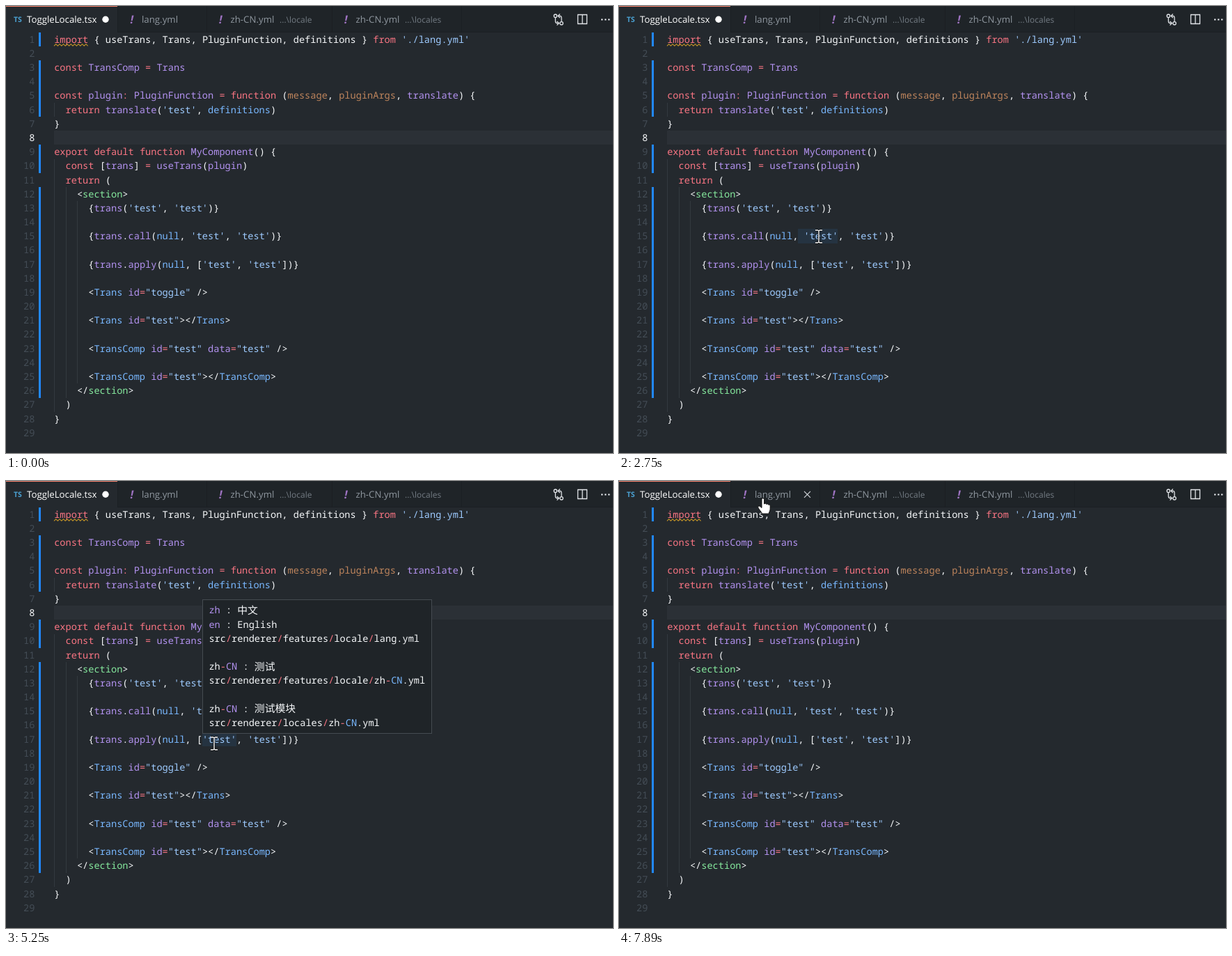
These frames come from a looping animation (872x642 px, 8 s). An HTML page:

```html
<!DOCTYPE html>
<html lang="en">
<head>
<meta charset="utf-8">
<title>Editor hover hints</title>
<style>
  html, body { margin: 0; width: 100%; height: 100%; overflow: hidden; background: #24292e; }
  svg { display: block; }
  text { white-space: pre; text-rendering: geometricPrecision; }
  .code { font: 13.63px "Noto Sans Mono", "DejaVu Sans Mono", monospace; }
  .cjk { font: 300 14.8px "Noto Sans CJK SC", "Noto Sans CJK", sans-serif; }
  .tab { font: 13.25px "Open Sans", "Noto Sans", sans-serif; fill: #8f979f; }
  .dir { font-size: 12px; fill: #737b83; }
  .bang { font-size: 16px; font-weight: 700; font-style: italic; fill: #a074c4; }
  .w { fill: #f6f8fa; }
  .r { fill: #f97583; }
  .p { fill: #b392f0; }
  .s { fill: #9ecbff; }
  .b { fill: #79b8ff; }
  .g { fill: #85e89d; }
  .o { fill: #bd845c; }
  .n { fill: #444d56; }
  .icon { fill: none; stroke: #e1e4e8; stroke-width: 1.3; }
</style>
</head>
<body>
<svg id="stage" width="872" height="642" viewBox="0 0 872 642">
  <rect x="160" width="712" height="38" fill="#1f2428"/>
  <path d="M160.5 0V37.5H872M288.5 0V37M468.5 0V37M654.5 0V37" fill="none" stroke="#1b1f23"/>
  <rect width="160" height="1" fill="#f9826c"/>
  <text class="tab" x="11" y="23" style="font-size:10.5px;font-weight:700;fill:#4a9fd0">TS</text>
  <text class="tab" x="30" y="24" style="fill:#fff">ToggleLocale.tsx</text>
  <circle cx="143" cy="19.3" r="4.7" fill="#fff"/>
  <g id="tabs"></g>
  <g class="icon">
    <circle cx="789.3" cy="14.2" r="2.2"/>
    <circle cx="798" cy="24.8" r="2.2"/>
    <path d="M789.3 16.5V22q0 2.8 3 2.8H794M791.5 22l2.8 2.8-2.8 2.8M798 22.5V17q0-2.8-3-2.8H793.3M795.8 11.4L793 14.2l2.8 2.8"/>
    <path d="M821.5 12.5h13v13h-13zM828 12.5v13"/>
  </g>
  <path d="M855 19.5h2.4M860 19.5h2.4M865 19.5h2.4" stroke="#e1e4e8" stroke-width="2.2"/>
  <path id="close" d="M266 14.8l9 9M275 14.8l-9 9" stroke="#d1d5da" stroke-width="1.2"/>
  <rect x="69" y="179" width="803" height="20" fill="#2b3036"/>
  <g id="marks" shape-rendering="crispEdges"></g>
  <g id="code"></g>
  <g id="hints"></g>
  <g id="beam" fill="none"></g>
  <path id="hand" d="M-2 1.5a1.8 1.8 0 0 1 3.6 0V8c.4-1 3-1 3.2.6c.6-1 2.8-.8 3 .8c.8-.7 2.4-.3 2.4 1.4V15c0 3-1.5 4-2 7H-1.5c0-2-5.5-7-5.8-9.5c0-1.8 2.5-2 3.5-.6L-2 13.5z" fill="#fff" stroke="#111"/>
</svg>
<script>
const LOOP = 8000, CHAR = 8.18, ROW = 20.18, LEFT = 69.2;
const $ = id => document.getElementById(id);
const rowY = n => 48 + (n - 1) * ROW;
const colX = c => LEFT + c * CHAR;

function add(parent, tag, attrs, text) {
  const el = document.createElementNS('http://www.w3.org/2000/svg', tag);
  for (const key in attrs) el.setAttribute(key, attrs[key]);
  if (text) el.textContent = text;
  parent.appendChild(el);
  return el;
}

// "~r" and the like switch the colour; words sit on the character grid
function write(parent, source, x, y) {
  let col = 0;
  for (const part of source.split('~').slice(1)) {
    const body = part.slice(1);
    for (const m of body.matchAll(/\S+/g)) {
      const cjk = /[^\x00-\x7f]/.test(m[0]);
      add(parent, 'text', {
        class: (cjk ? 'cjk ' : 'code ') + part[0],
        x: x + (col + m.index) * CHAR, y: y + (cjk ? 5.3 : 4.7)
      }, m[0]);
    }
    col += body.length;
  }
}

const lines = [
  "~rimport~w { useTrans, Trans, PluginFunction, definitions } ~rfrom ~s'./lang.yml'",
  '',
  '~rconst ~pTransComp ~r= ~pTrans',
  '',
  '~rconst ~pplugin~r: ~pPluginFunction ~r= function ~w(~omessage~w, ~opluginArgs~w, ~ptranslate~w) {',
  "~r  return ~ptranslate~w(~s'test'~w, ~bdefinitions~w)",
  '~w}',
  '',
  '~rexport default function ~pMyComponent~w() {',
  '~r  const ~w[~ptrans~w] ~r= ~puseTrans~w(~pplugin~w)',
  '~r  return ~w(',
  '~w    <~gsection~w>',
  "~w      {~ptrans~w(~s'test'~w, ~s'test'~w)}",
  '',
  "~w      {~ptrans~w.~pcall~w(~bnull~w, ~s'test'~w, ~s'test'~w)}",
  '',
  "~w      {~ptrans~w.~papply~w(~bnull~w, [~s'test'~w, ~s'test'~w])}",
  '',
  '~w      <~bTrans ~pid~r=~s"toggle" ~w/>',
  '',
  '~w      <~bTrans ~pid~r=~s"test"~w></~bTrans~w>',
  '',
  '~w      <~bTransComp ~pid~r=~s"test" ~pdata~r=~s"test" ~w/>',
  '',
  '~w      <~bTransComp ~pid~r=~s"test"~w></~bTransComp~w>',
  '~w    </~gsection~w>',
  '~w  )',
  '~w}',
  ''
];

const path = s => '~w' + s.replace(/\//g, '~r/~w').replace('-CN', '~r-~bCN~w');
const label = s => '~wzh~r-~pCN~w : ' + s;
const langFile = path('src/renderer/features/locale/lang.yml');
const zhFile = path('src/renderer/features/locale/zh-CN.yml');
const testRows = [
  '~pzh~w : 中文', '~pen~w : English', langFile, '',
  label('测试'), zhFile, '',
  label('测试模块'), path('src/renderer/locales/zh-CN.yml')
];
const toggleRows = [
  '~pzh~w : 切换至英文', '~pen~w : Toggle To Chinese', langFile, '',
  label('切换'), zhFile
];

// the word lights up at "on", its box is solid at "open", both go at "off"
const FADE = 60;
const hints = [
  { line: 15, col: 23, chars: 7, rows: testRows, on: 2750, open: 2920, off: 4157 },
  { line: 17, col: 26, chars: 6, rows: testRows, on: 4630, open: 4790, off: 5335 },
  { line: 19, col: 16, chars: 8, rows: toggleRows, on: 6410, open: 6500, off: 7108 }
];

function buildTabs() {
  const tab = (x, name, dir) => {
    add($('tabs'), 'text', { class: 'tab bang', x, y: 25 }, '!');
    add($('tabs'), 'text', { class: 'tab', x: x + 16.5, y: 24 }, name);
    add($('tabs'), 'text', { class: 'tab dir', x: x + 87, y: 24 }, dir);
  };
  tab(178.5, 'lang.yml', '');
  tab(306, 'zh-CN.yml', '...\\locale');
  tab(486, 'zh-CN.yml', '...\\locales');
}

function buildEditor() {
  const bar = (x, from, to, width, fill) => {
    const y = Math.round(rowY(from - .5)), bottom = Math.round(rowY(to + .5));
    return add($('marks'), 'rect', { x: Math.round(x), y, width, height: bottom - y, fill });
  };
  for (const [a, b] of [[1, 1], [3, 6], [9, 10], [12, 26]]) bar(47, a, b, 3, '#2188ff');
  let indent = 0;
  lines.forEach((line, i) => {
    const n = i + 1;
    if (line) indent = line.slice(2).search(/\S|$/);
    for (let c = 0; c < indent; c += 2) bar(colX(c), n, n, 1, '#33393f');
    write($('code'), (n === 8 ? '~w' : '~n') + String(n).padStart(2), 25, rowY(n));
    write($('code'), line, LEFT, rowY(n));
  });
  for (const h of hints) h.mark = bar(colX(h.col), h.line, h.line, Math.round(h.chars * CHAR), '#253341');
  add($('code'), 'path', {
    d: 'M69 57.3' + 'l2.7 -2.6l2.7 2.6'.repeat(9), fill: 'none', stroke: '#cc9a26', 'stroke-width': 1.1
  });
}

function buildHints() {
  for (const h of hints) {
    const height = h.rows.length * ROW + 10;
    const x = Math.round(colX(h.col));
    const y = rowY(h.line - .5) + 1.5 - height;
    h.box = add($('hints'), 'g', {});
    add(h.box, 'rect', {
      x: x + .5, y: Math.floor(y) + .5, width: 329, height: Math.round(height),
      fill: '#1f2428', stroke: '#454b51'
    });
    h.rows.forEach((row, i) => write(h.box, row, x + 9.4, y + 15 + i * ROW));
  }
}

function buildBeam() {
  const d = 'M-5 -9H-1.5L0 -8L1.5 -9H5M0 -8V8M-5 9H-1.5L0 8L1.5 9H5';
  add($('beam'), 'path', { d, stroke: '#000', 'stroke-width': 2.8 });
  add($('beam'), 'path', { d, stroke: '#fff', 'stroke-width': 1.4 });
}

// each move starts where the last one ended; bow bends it sideways
const moves = [
  { start: 520, end: 750, steps: 4, x: 646, y: 531 },
  { start: 900, end: 1070, steps: 3, x: 672, y: 508 },
  { start: 1390, end: 1990, steps: 9, x: 382, y: 346 },
  { start: 2065, end: 2140, steps: 2, x: 317, y: 394 },
  { start: 2230, end: 2520, steps: 5, x: 287, y: 331 },
  { start: 4080, end: 4310, steps: 4, x: 299, y: 377 },
  { start: 5250, end: 6010, steps: 10, x: 218, y: 419 },
  { start: 7030, end: 7890, steps: 12, x: 207, y: 25, bow: -27 }
];
const entry = { x: 632, y: 621 };
const smooth = p => p * p * (3 - 2 * p);

function pointer(t) {
  const i = moves.findLastIndex(m => m.start <= t);
  if (i < 0) return null;
  const to = moves[i], from = moves[i - 1] || entry, last = to.steps - 1;
  const step = Math.floor((t - to.start) / (to.end - to.start) * last + .15);
  const p = smooth(Math.min(1, step / last));
  const bend = (to.bow || 0) * Math.sin(Math.PI * p);
  return [from.x + (to.x - from.x) * p + bend, from.y + (to.y - from.y) * p].map(Math.round);
}

const show = (el, on) => { el.style.visibility = on ? 'visible' : 'hidden'; };

function draw(t) {
  for (const h of hints) {
    show(h.mark, t >= h.on && t < h.off);
    show(h.box, t >= h.open - FADE && t < h.off);
    h.box.style.opacity = t < h.open ? .5 : 1;
  }
  const pos = pointer(t);
  const onTab = !!pos && pos[1] < 37;
  show($('beam'), pos && !onTab);
  show($('hand'), onTab);
  show($('close'), onTab);
  if (pos) $(onTab ? 'hand' : 'beam').setAttribute('transform', `translate(${pos})`);
}

buildTabs();
buildEditor();
buildHints();
buildBeam();
const begin = performance.now();
function tick() {
  draw((performance.now() - begin) % LOOP);
  requestAnimationFrame(tick);
}
tick();
</script>
</body>
</html>
```
